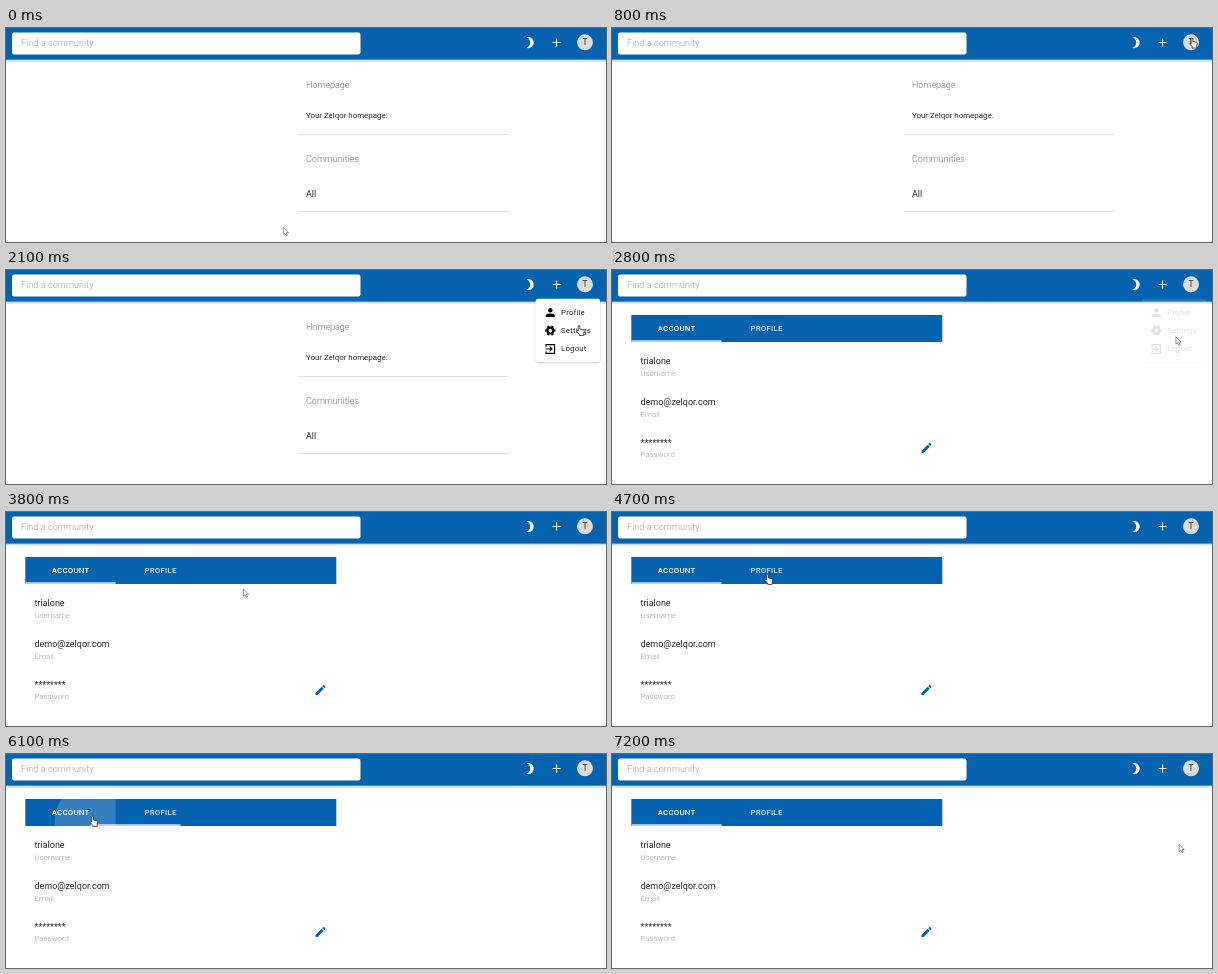
An HTML page for the animation above (7300 ms loop, 600 px wide and 214 px high).

```html
<!DOCTYPE html>
<html lang="en">
<head>
<meta charset="utf-8">
<title>Account settings</title>
<style>
  html, body { margin: 0; width: 100%; height: 100%; overflow: hidden; background: #fff; }
  svg { display: block; width: 100%; height: 100%; }
  text { font: 400 9px Roboto, sans-serif; fill: #2b2b2b; }
  .hint { font-weight: 300; fill: #a0a0a0; }
  .heading { font-weight: 300; fill: #757575; }
  .small { font-size: 7.9px; }
  .tab { font-size: 7.9px; font-weight: 500; letter-spacing: .22px; fill: #fff; text-anchor: middle; }
  .item { font-size: 7.9px; letter-spacing: .15px; }
  .rule { stroke: #e0e0e0; }
  .blue { fill: #0562af; }
  #menu { transform-origin: 590px 29px; }
</style>
</head>
<body>
<svg viewBox="0 0 600 214" preserveAspectRatio="none">
  <defs>
    <linearGradient id="shade" x2="0" y2="1">
      <stop stop-color="#0562af" stop-opacity=".5"/>
      <stop offset="1" stop-color="#8aa4d0" stop-opacity="0"/>
    </linearGradient>
    <filter id="lift" x="-20%" y="-20%" width="140%" height="140%">
      <feDropShadow dx="0" dy="1" stdDeviation="1.2" flood-opacity=".2"/>
    </filter>
    <clipPath id="tabClip"><rect id="clipRect" y="45" width="90" height="27"/></clipPath>
    <path id="pencil" class="blue" transform="scale(.5625) translate(-12 -12)" d="M3 17.25V21h3.75L17.81 9.94l-3.75-3.75zM20.71 7.04c.39-.39.39-1.02 0-1.41l-2.34-2.34c-.39-.39-1.02-.39-1.41 0l-1.83 1.83 3.75 3.75z"/>
  </defs>

  <rect width="600" height="214" fill="#fff"/>
  <rect y="31" width="600" height="3.5" fill="url(#shade)"/>
  <rect class="blue" width="600" height="31.5"/>
  <rect x="6" y="4.5" width="348.5" height="22" rx="2.2" fill="#fff"/>
  <text class="hint" x="15" y="18.2" letter-spacing=".1">Find a community</text>
  <path fill="#fff" transform="translate(517 7.75) scale(.5625)" d="M9 2c-1.05 0-2.05.16-3 .46 4.06 1.27 7 5.06 7 9.54s-2.94 8.27-7 9.54c.95.3 1.95.46 3 .46 5.52 0 10-4.48 10-10S14.52 2 9 2z"/>
  <path stroke="#fff" stroke-width="1.2" d="M546.6 14.5h7.9M550.55 10.55v7.9"/>
  <circle cx="579" cy="14.3" r="8" fill="#dcdcdc"/>
  <text x="579" y="17.3" text-anchor="middle" style="font-size:8.4px">T</text>

  <g id="home">
    <text class="heading" x="300" y="59.5">Homepage</text>
    <text class="small" x="300" y="90">Your Zelqor homepage.</text>
    <path class="rule" d="M292 106.5h210.5M292 183.5h210.5"/>
    <text class="heading" x="300" y="134">Communities</text>
    <text x="300" y="168.5">All</text>
  </g>

  <g id="settings">
    <rect class="blue" x="19.3" y="45" width="311" height="27"/>
    <g clip-path="url(#tabClip)"><circle id="ripple" cy="67" fill="#fff"/></g>
    <text id="accountTab" class="tab" x="64.6" y="61.3">ACCOUNT</text>
    <text id="profileTab" class="tab" x="154.6" y="61.3">PROFILE</text>
    <rect id="marker" y="70.4" width="90" height="1.3" fill="#fff"/>
    <g id="account">
      <text x="28.5" y="94">trialone</text>
      <text class="hint small" x="28.5" y="106">Username</text>
      <text x="28.5" y="134.5">demo@zelqor.com</text>
      <text class="hint small" x="28.5" y="146.7">Email</text>
      <text x="28.5" y="175.5">********</text>
      <text class="hint small" x="28.5" y="187">Password</text>
      <use href="#pencil" x="314.5" y="178"/>
    </g>
    <g id="profile">
      <text x="28.5" y="94">Trial One</text>
      <text class="hint small" x="28.5" y="106">Name</text>
      <use href="#pencil" x="314.5" y="97"/>
    </g>
  </g>

  <g id="menu">
    <rect x="529.8" y="28.8" width="64.2" height="63" rx="2" fill="#fff" filter="url(#lift)"/>
    <circle cx="544.3" cy="40.2" r="2.25"/>
    <path d="M539.8 47v-1.2c0-3 9-3 9 0V47z"/>
    <g fill="none" stroke="#000">
      <circle cx="544.3" cy="60.6" r="2.9" stroke-width="2.2"/>
      <circle cx="544.3" cy="60.6" r="4.4" stroke-width="1.5" pathLength="12" stroke-dasharray="1" stroke-dashoffset=".5"/>
      <path d="M540 76.8v-2.2h8.6v8.8H540v-2.2M539.6 79h6M543.6 76.6l2.4 2.4-2.4 2.4" stroke-width="1.1"/>
    </g>
    <text class="item" x="555" y="45.4">Profile</text>
    <text class="item" x="555" y="63.4">Settings</text>
    <text class="item" x="555" y="81.4">Logout</text>
  </g>

  <g id="cursor" fill="#fff" stroke-linejoin="round">
    <path id="arrow" stroke="#777" stroke-width=".8" d="M.3.3v7.4l1.7-1.5 1.2 2.6 1.2-.6-1.2-2.5h2.3z"/>
    <path id="hand" stroke="#333" stroke-width=".8" d="M-.8 6V.9Q0-.4.8.9v3l3.6.8q1 .3.8 1.5l-.6 2.4v1.9H.2V9.3L-2.4 6.4q.3-1.4 1.6-.4z"/>
  </g>
</svg>

<script>
const LOOP = 7300, STEP = 100;
const TAB_X = { account: 19.6, profile: 109.6 };

// Pointer path: time, x, y
const path = [
  [0, 277, 199], [400, 432, 104], [800, 580, 9.5], [1900, 580, 9.5],
  [2100, 573, 55], [2200, 573, 63], [2700, 573, 63], [3300, 517, 84],
  [3600, 320, 90], [3800, 237, 76.5], [4100, 183, 67], [4400, 155.5, 62],
  [5300, 155.5, 62], [5700, 86.5, 62], [6500, 86.5, 62],
  [6700, 103.3, 100.5], [6900, 103.3, 100.5], [7200, 566.8, 90]
];
const clicks = [
  { tab: "profile", x: 155.5, down: 4720, up: 4860, r: 52 },
  { tab: "account", x: 86.5, down: 5900, up: 6020, r: 71 }
];

const $ = id => document.getElementById(id);
const set = (id, attrs) => {
  for (const name in attrs) $(id).setAttribute(name, attrs[name]);
};
const show = (id, on) => { $(id).style.display = on ? "" : "none"; };
const ramp = (t, start, length) => Math.min(1, Math.max(0, (t - start) / length));

// cubic-bezier(.4, 0, .2, 1)
function ease(p) {
  let low = 0, high = 1, u = p;
  for (let i = 0; i < 20; i++) {
    u = (low + high) / 2;
    const x = 1.2 * (1 - u) ** 2 * u + .6 * (1 - u) * u * u + u ** 3;
    if (x < p) low = u; else high = u;
  }
  return 3 * u * u - 2 * u ** 3;
}

function pointerAt(t) {
  const next = path.findIndex(key => key[0] > t);
  if (next < 0) return path.at(-1).slice(1);
  const [t0, x0, y0] = path[next - 1], [t1, x1, y1] = path[next];
  const p = (t - t0) / (t1 - t0);
  return [x0 + (x1 - x0) * p, y0 + (y1 - y0) * p];
}

function drawTabs(t) {
  const [toProfile, toAccount] = clicks;
  const onProfile = t >= toProfile.up && t < toAccount.up;
  show("account", !onProfile);
  show("profile", onProfile);
  set("accountTab", { "fill-opacity": onProfile ? .8 : 1 });
  set("profileTab", { "fill-opacity": onProfile ? 1 : .8 });

  const shift = ease(ramp(t, toProfile.up, 300)) - ease(ramp(t, toAccount.up, 300));
  set("marker", { x: TAB_X.account + (TAB_X.profile - TAB_X.account) * shift });

  const click = t < toAccount.down ? toProfile : toAccount;
  set("clipRect", { x: TAB_X[click.tab] });
  set("ripple", {
    cx: click.x,
    r: click.r * ease(ramp(t, click.down, 550)),
    "fill-opacity": .2 * (1 - ease(ramp(t, click.up, 550)))
  });
}

function drawMenu(t) {
  const grow = ease(ramp(t, 1230, 250));
  const opacity = grow * (1 - ramp(t, 2650, 170));
  show("menu", opacity > 0);
  $("menu").style.opacity = opacity;
  $("menu").style.transform = `scale(${.75 + .25 * grow}, ${.56 + .44 * grow})`;
}

function draw(t) {
  const inSettings = t >= 2700;
  show("home", !inSettings);
  show("settings", inSettings);
  drawMenu(t);
  drawTabs(t);

  const hand = (t >= 800 && t < 2700) || (t >= 4100 && t < 6600);
  show("hand", hand);
  show("arrow", !hand);
  set("cursor", { transform: `translate(${pointerAt(t)})` });
}

function tick() {
  const t = performance.now() % LOOP;
  draw(Math.floor(t / STEP) * STEP);
  requestAnimationFrame(tick);
}
tick();
</script>
</body>
</html>
```
